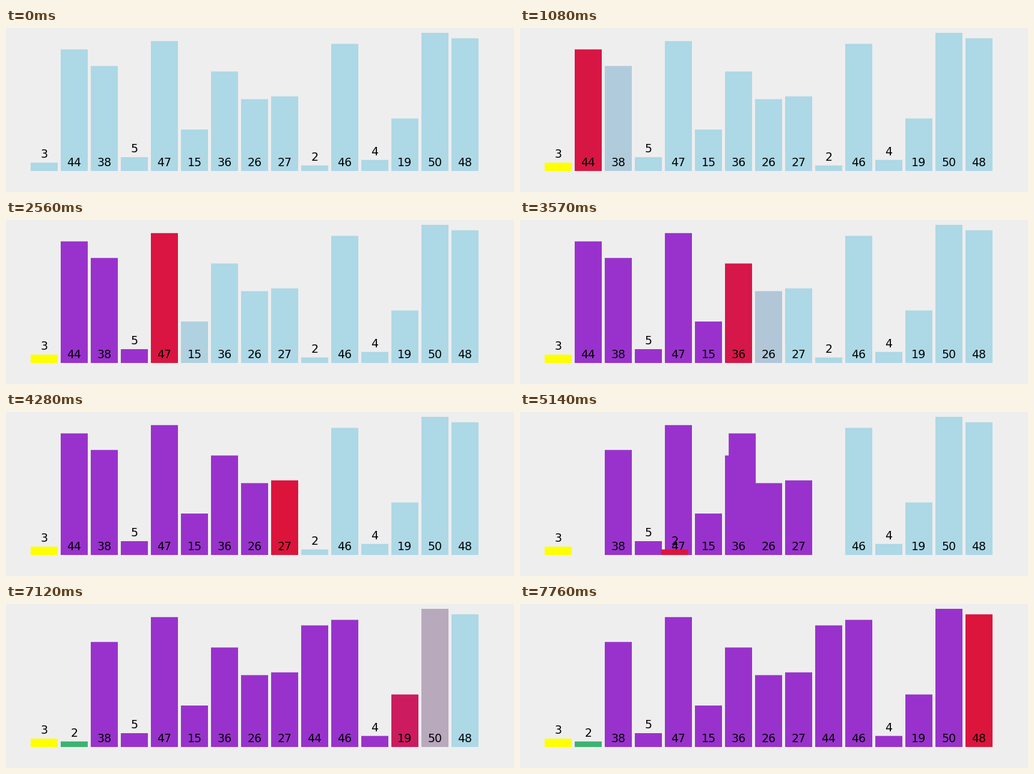
These frames come from a looping animation (845x273 px, 8000 ms). A matplotlib script:

```python
import matplotlib.pyplot as plt
import numpy as np
from matplotlib.animation import FuncAnimation
from matplotlib.colors import to_rgb
from matplotlib.patches import Rectangle

W, H, DPI = 845, 273, 64
LOOP, INTERVAL = 8000, 20
PERIOD, DURATION = 500, 250     # a step starts every PERIOD ms
REFRESH, PHASE = 78.4, 42       # the picture is redrawn on a slower clock

VALUES = [3, 44, 38, 5, 47, 15, 36, 26, 27, 2, 46, 4, 19, 50, 48]
LEFT, PITCH, BAR_W, BASE, UNIT = 41, 50, 45, 238, 4.6
PAD, FONT_PX = 8, 19

IDLE, PIVOT, CURRENT, LARGER, SMALLER = (
    np.array(to_rgb(c))
    for c in ("lightblue", "yellow", "crimson", "darkorchid", "mediumseagreen"))


def partition_states():
    """Slots and colours after every step of the quicksort partition."""
    slots = np.arange(len(VALUES), dtype=float)
    colors = np.array([IDLE] * len(VALUES))
    states = [(slots.copy(), colors.copy())]

    def save():
        states.append((slots.copy(), colors.copy()))

    colors[0] = PIVOT
    save()
    store, mark = 1, PIVOT
    for i in range(1, len(VALUES)):
        colors[i - 1] = mark
        colors[i] = CURRENT
        save()
        mark = LARGER
        if VALUES[i] < VALUES[0]:
            slots[[store, i]] = slots[[i, store]]
            store += 1
            save()
            mark = SMALLER
    return states


STATES = partition_states()


def ease(t):
    t = min(max(t, 0), 1)
    return 4 * t ** 3 if t < 0.5 else 1 - 4 * (1 - t) ** 3


def state_at(ms):
    step = min(int(ms // PERIOD), len(STATES) - 2)
    k = ease((ms - step * PERIOD) / DURATION)
    (s0, c0), (s1, c1) = STATES[step], STATES[step + 1]
    return s0 + (s1 - s0) * k, c0 + (c1 - c0) * k


def last_redraw(ms):
    return max(0, PHASE + (ms - PHASE) // REFRESH * REFRESH)


plt.rcParams["font.family"] = "DejaVu Sans"
fig = plt.figure(figsize=(W / DPI, H / DPI), dpi=DPI, facecolor="#eeeeee")
ax = fig.add_axes([0, 0, 1, 1])
ax.set(xlim=(0, W), ylim=(H, 0))
ax.axis("off")

bars, labels = [], []
for i, value in enumerate(VALUES):
    height = value * UNIT
    top = BASE - height
    bar = Rectangle((0, top), BAR_W, height, lw=0, snap=False, zorder=i + 1)
    bars.append(ax.add_patch(bar))
    baseline = (top if value < 10 else BASE) - PAD
    labels.append(ax.text(0, baseline, str(value), color="black",
                          size=FONT_PX * 72 / DPI, ha="center",
                          va="baseline", zorder=i + 1.5))


def draw(frame):
    slots, colors = state_at(last_redraw((frame + 1) * INTERVAL))
    for bar, label, slot, color in zip(bars, labels, slots, colors):
        x = LEFT + PITCH * slot
        bar.set_x(x)
        bar.set_facecolor(color)
        label.set_x(x + BAR_W / 2)
    return bars + labels


anim = FuncAnimation(fig, draw, frames=LOOP // INTERVAL, interval=INTERVAL,
                     repeat=True, repeat_delay=0)
plt.show()
```
